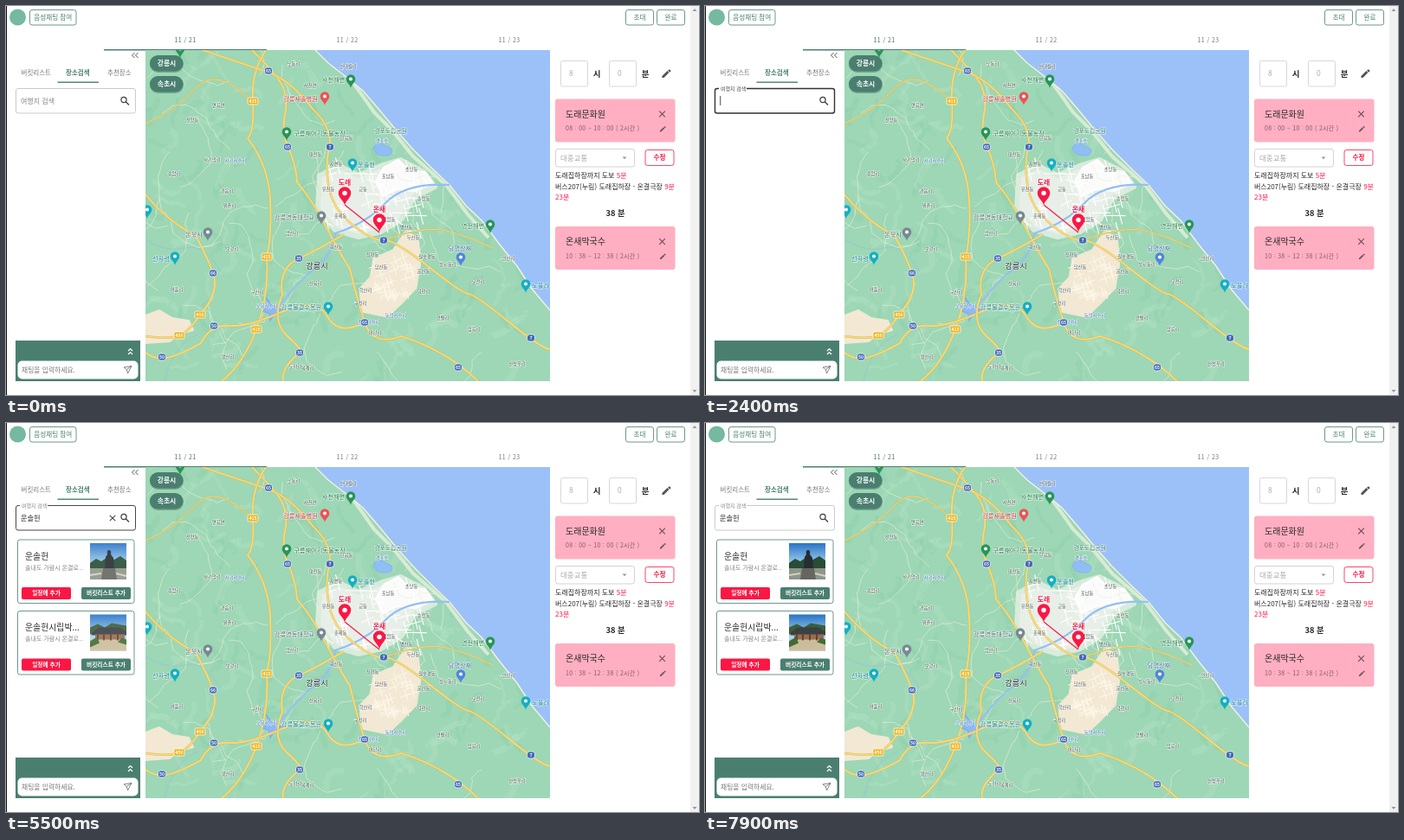
An HTML page that plays this animation: 800x450 px, repeating every 8 s.

```html
<!DOCTYPE html>
<html lang="ko">
<head>
<meta charset="utf-8">
<title>여행 일정</title>
<style>
html,body{margin:0;width:100%;height:100%;overflow:hidden;background:#fff}
svg{display:block;width:100vw;height:100vh;font-family:"Noto Sans CJK KR","Noto Sans CJK JP","Noto Sans CJK",sans-serif}
text{white-space:pre}
.halo{paint-order:stroke;stroke:#fff;stroke-opacity:.65;stroke-width:1.3px;stroke-linejoin:round}
</style>
</head>
<body>
<svg id="stage" viewBox="0 0 800 450"></svg>
<script>
const GREEN = '#4a7f70', RED = '#fb1744', PINK = '#ffafc1', GRAY = '#858585', DARK = '#272727';
const LOOP = 8000;

const text = (s, x, y, size, fill = DARK, extra = '') =>
  `<text x="${x}" y="${y}" font-size="${size}" fill="${fill}" ${extra}>${s}</text>`;
const MID = 'text-anchor="middle"', BOLD = 'font-weight="700"';
const rect = (x, y, w, h, fill, r = 0, extra = '') =>
  `<rect x="${x}" y="${y}" width="${w}" height="${h}" rx="${r}" fill="${fill}" ${extra}/>`;
const path = (d, stroke, width = 1, fill = 'none', extra = '') =>
  `<path d="${d}" stroke="${stroke}" stroke-width="${width}" fill="${fill}" ${extra}/>`;
const group = (body, extra = '') => `<g ${extra}>${body}</g>`;
const outlined = (x, y, w, h, color, label, size = 7.6, extra = '') =>
  rect(x + .5, y + .5, w - 1, h - 1, '#fff', 2.5, `stroke="${color}" stroke-width=".8"`) +
  text(label, x + w / 2, y + h / 2 + 2.8, size, color, MID + ' ' + extra);
const cross = (x, y, r, color = '#444') =>
  path(`M${x - r} ${y - r}l${2 * r} ${2 * r}m0 ${-2 * r}l${-2 * r} ${2 * r}`, color, 1.1);
const pencil = (x, y, s, color) =>
  group(`<path d="M-5 5v-2.200l6.500-6.500 2.200 2.200-6.500 6.500zM2.300-4.100l1.200-1.200q.6-.5 1.200 0l1 1q.5.600 0 1.200l-1.200 1.200z"/>`,
    `fill="${color}" transform="translate(${x} ${y}) scale(${s})"`);

let seed = 11;
const random = () => (seed = seed * 16807 % 2147483647) / 2147483647;
const wander = (x, y, steps, stride) => {
  let d = `M${x} ${y}`, angle = random() * 6.28;
  for (let i = 0; i < steps; i++) {
    angle += (random() - .5) * 1.7;
    d += `q${((random() - .5) * 6).toFixed(1)} ${((random() - .5) * 6).toFixed(1)} ` +
      `${(Math.cos(angle) * stride).toFixed(1)} ${(Math.sin(angle) * stride).toFixed(1)}`;
  }
  return d;
};

// ---------- map ----------
const COAST = 'M357 51L372 66 394 83 412 98 430 119 449 142 470 166 491 187 512 207 531 231 549 248 570 276 590 301 607 327 628 352';

const pin = (x, y, s, color) => group(
  `<path d="M0 11C-1.500 6-6 4-6-.500a6 6 0 0 1 12 0C6 4 1.500 6 0 11z" fill="${color}"/><circle r="2.300" cy="-.5" fill="#fff"/>`,
  `transform="translate(${x} ${y}) scale(${s})"`);

function shield(name, x, y, yellow) {
  const w = name.length > 2 ? 12 : 9;
  return rect(x - w / 2, y - 4, w, 8, yellow ? '#f2b51d' : '#4069b5', yellow ? 1.5 : 3, 'stroke="#fff" stroke-width=".7"') +
    text(name, x, y + 2, 5.2, '#fff', MID + ' ' + BOLD);
}

function terrain() {
  let s = '';
  for (let i = 0; i < 150; i++) {
    const x = 161 + random() * 440, y = 51 + random() * 380;
    s += path(wander(x, y, 4, 9), i % 2 ? '#b4e1c5' : '#8cceaa', 3 + random() * 5, 'none', 'opacity=".38"');
  }
  const patch = 'stroke-linejoin="round"';
  s += path('M425 292l22-9 14-21 14 6 3 27-5 31-18 19-15 14-29-6-2-26 12-13z', '#efe9d4', 3, '#f3e8d4', patch);
  s += path('M161 358l16-6 15 9 19 3 5 11-17 5-10 8-28 2z', '#efe9d4', 2, '#f3e8d4', patch);
  s += path('M362 196l24-10 21 10 28-12 20-6 27 14 13 17-24 12-15 26-23 14-26 6-27-8-20-24z', '#d9ebdc', 6, '#e8efe9', patch);
  s += path('M436 187l17-9 12 12 19 2 9 13-21 9-21-2-16 8-8-17z', '#fff', 2, '#fbfbfb', patch);
  s += path('M377 66l18 15 16 22 14 20 20 20 25 31 38 33 25 34 24 27', '#d8ebd4', 4);
  for (let i = 0; i < 38; i++) s += path(wander(170 + random() * 400, 60 + random() * 370, 7, 15), '#eaf0d5', .8, 'none', 'opacity=".8"');
  for (let i = 0; i < 34; i++) {
    const x = 365 + random() * 105, y = 190 + random() * 75;
    s += path(`M${x} ${y}l${8 + random() * 20} ${random() * 14 - 7}m-9-9l5 19`, '#fff', 1.1);
  }
  for (let i = 0; i < 30; i++) {
    const x = 418 + random() * 45, y = 292 + random() * 48;
    s += path(`M${x} ${y}l12-4m-7-5l4 12`, '#fff8ea', 1);
  }
  return s;
}

const water = () =>
  path(COAST + 'V51z', '#9bc1f8', 1, '#9bc1f8') + path(COAST, '#f5f1df', 1.4) +
  path('M424 164q4-7 11-4l10 5q3 7-6 8-13 1-15-9z', '#84b4f3', 1, '#91bdf5') +
  path('M300 337l4 9-9 7 8 2 2 9 5-8 9-5-10-2z', '#80aff0', 1.5, '#8bb8f5') +
  path('M310 355Q335 320 356 304T380 263Q415 252 438 228T512 207', '#94bff5', 2.2) +
  path('M161 270q25 16 46 10t41 27m-65 127q10-43 39-54', '#91c3df', .8);

function roads() {
  const yellow = [
    'M284 51Q303 70 314 84T323 120Q317 144 326 164T336 204Q354 225 370 256T397 304Q405 338 414 366T456 382Q506 397 545 434',
    'M300 51Q283 76 285 110T279 153Q303 184 305 224T301 290Q304 334 289 374T249 434',
    'M161 401Q174 411 190 406T225 390Q236 368 257 370T318 354 371 359 414 366',
    'M161 382Q190 386 201 381T224 357Q247 331 239 309T219 266Q184 247 161 218',
    'M390 264Q362 281 338 292T319 334Q306 365 325 382T339 401Q317 419 320 434',
    'M227 51Q274 67 301 76T354 119Q378 142 373 164T373 211 401 254 436 271 487 301 534 333 580 365 628 397',
    'M161 136Q196 121 219 95T284 110',
    'M436 271Q483 254 508 260T562 280'];
  const both = (d, w) => path(d, '#d7b75c', w + .8) + path(d, '#fbdc76', w);
  return yellow.map((d, i) => both(d, i < 6 ? 1.7 : .9)).join('');
}

const VILLAGES = `산대월리 395 72,선양동 215 134,사기막리 238 180,송암리 194 196,어흘리 197 330,위촌리 258 233,
관음리 255 216,금산리 330 265,구산리 290 333,산북리 357 323,회산동 381 281,장현동 423 290,담산동 433 304,
유천동 372 214,홍제동 386 245,교동 412 214,포남동 441 199,초당동 468 191,송정동 482 225,입암동 442 249,
병산동 462 258,두산동 470 270,월호평동 486 292,운산동 482 309,학산리 415 331,구정리 409 346,어단리 426 380,
덕현리 482 332,상시동리 510 301,언별리 504 363,모전리 545 321,안인리 580 294,산성우리 590 416,임곡리 540 376,
목계리 348 421,왕산리 256 408,도마리 334 419,보광리 261 283,난곡동 393 155,대전동 357 174,지변동 381 185,
사천면 351 94,노동리 332 69,연곡면 245 117`.split(',').map(v => v.trim().split(' '));

const POIS = [
  ['사천해변', 378, 88, '#287b4e', 398, 85], ['강릉새솔병원', 340, 110, '#d4343e', 368, 105],
  ['구름재아기동물농장', 362, 150, '#28774c', 324, 146], ['운솔헌', 416, 186, '#148197', 400, 182],
  ['강릉영동대학교', 333, 247, '#596a73', 364, 243], ['온묵사', 217, 267, '#596a73', 233, 262],
  ['선자령', 179, 295, '#148197', 195, 290], ['강릉물결수목원', 341, 351, '#148197', 372, 348],
  ['영전해변', 539, 257, '#287b4e', 559, 253], ['담명상재', 524, 283, '#3d67aa', 525, 291],
  ['노을라', 617, 326, '#148197', 600, 322], ['', 0, 0, '#148197', 163, 236], ['', 0, 0, '#287b4e', 201, 50]];
const PIN_COLORS = { '#287b4e': '#279557', '#28774c': '#279557', '#d4343e': '#ef5155', '#148197': '#12afc5', '#596a73': '#788895', '#3d67aa': '#5185dc' };

const SHIELDS = [['415', 285, 110], ['415', 301, 290], ['415', 289, 374], ['456', 224, 357], ['456', 200, 381],
  ['65', 325, 163], ['65', 303, 75], ['7', 374, 163], ['7', 436, 271], ['35', 338, 292], ['66', 239, 309],
  ['50', 240, 370], ['50', 180, 406], ['35', 339, 401], ['65', 522, 418], ['7', 606, 384], ['65', 414, 366]];

function map() {
  const halo = MID + ' class="halo"';
  let s = rect(161, 51, 467, 383, '#9dd7b5') + terrain() + water() + roads();
  s += VILLAGES.map(([n, x, y]) => text(n, x, y, 5.3, '#46544d', halo)).join('');
  s += [['경포도립공원', 444, 147], ['경포호', 434, 158], ['오봉저수지', 301, 349], ['칠성저수지', 419, 368], ['동막저수지', 450, 360], ['사기저수지', 265, 181]]
    .map(([n, x, y], i) => text(n, x, y, i ? 5.3 : 6.8, i ? '#3e70b9' : '#337d66', halo)).join('');
  s += SHIELDS.map(([n, x, y]) => shield(n, x, y, n.length > 2)).join('');
  s += POIS.map(([n, x, y, c, px, py]) => pin(px, py, .88, PIN_COLORS[c]) + text(n, x, y, 7.2, c, halo)).join('');
  s += text('강릉시', 359, 304, 9.2, '#222', halo + ' font-weight="500"');
  s += path('M391 230L431 262', RED, 1.2);
  for (const [n, x, y] of [['도래', 391, 217], ['온새', 431, 248]])
    s += pin(x, y, 1.2, RED) + text(n, x, y - 10, 7.8, RED, halo + ' ' + BOLD);
  for (const [n, y] of [['강릉시', 57], ['속초시', 81]])
    s += rect(166, y + 1, 39, 19, '#173b30', 9.5, 'opacity=".3"') + rect(166, y, 38.5, 18.5, GREEN, 9.2) +
      text(n, 185.5, y + 12.2, 7.8, '#fff', MID + ' ' + BOLD);
  return `<clipPath id="mapClip"><path d="M161 51h467v383H161z"/></clipPath>` + group(s, 'clip-path="url(#mapClip)"');
}

// ---------- fixed interface ----------
function header() {
  let s = '<circle cx="13.500" cy="13" r="9.500" fill="#74b9a0"/>';
  s += outlined(27, 4, 54.5, 18.5, GREEN, '음성채팅 참여') + outlined(715, 4, 33, 18.5, GREEN, '초대') + outlined(751, 4, 33, 18.5, GREEN, '완료');
  [21, 22, 23].forEach((day, i) => s += text('11 / ' + day, 207 + i * 187, 41.5, 7, i ? '#777' : '#476e63', MID + ' letter-spacing=".4"'));
  return s + rect(113, 50, 188, 1.5, GREEN);
}

function leftPanel() {
  let s = path('M148.500 54l-3 3 3 3m4-6l-3 3 3 3', '#555', 1);
  s += text('버킷리스트', 17.5, 79.5, 7.5, '#777') + text('장소검색', 69, 79.5, 7.5, GREEN, BOLD) + text('추천장소', 117, 79.5, 7.5, '#777');
  s += rect(59.5, 87.5, 47.5, 1.4, GREEN);
  s += rect(11, 387, 144, 47, GREEN) + path('M141 399l2.500-2.500 2.500 2.500m-5 4l2.500-2.500 2.500 2.500', '#fff', 1.2);
  s += rect(13.5, 410.5, 139, 21, '#fff', 5) + text('채팅을 입력하세요.', 18, 424, 7.8, '#777');
  return s + path('M136 418l9-1.500-4.500 8.500-1.200-4.500zm3.300 2.500l5.700-4', '#666', .8);
}

function placeCard(y, name, time) {
  return rect(634, y, 138.5, 50, PINK, 3) + text(name, 646, y + 21.3, 10, DARK, 'font-weight="500"') + cross(757.5, y + 17.5, 3.3, '#704a54') +
    text(time + ' ( 2시간 )', 646, y + 36.7, 7, '#805e67', 'letter-spacing=".3"') + pencil(758, y + 35, .62, '#70545d');
}

function rightPanel() {
  let s = '';
  for (const [x, digit, unit] of [[640, '8', '시'], [696, '0', '분']])
    s += rect(x + .5, 63.5, 31, 29.5, '#fff', 2, 'stroke="#cfcfcf" stroke-width=".8"') +
      text(digit, x + 10, 81.3, 8.5, '#aaa') + text(unit, x + 42, 81.5, 9.5, DARK, MID + ' ' + BOLD);
  s += pencil(762, 78.5, .92, '#555');
  s += placeCard(107.5, '도래문화원', '08 : 00 ~ 10 : 00') + placeCard(255, '온새막국수', '10 : 38 ~ 12 : 38');
  s += rect(634.5, 165.5, 91, 20.5, '#fff', 2.5, 'stroke="#c8c8c8" stroke-width=".8"') + text('대중교통', 640, 178.8, 8.5, '#aaa') +
    path('M711.500 174.500h5l-2.500 2.800z', 'none', 0, '#999');
  s += outlined(737.5, 166, 34, 19, RED, '수정', 7.5, BOLD);
  const mark = v => `<tspan fill="${RED}">${v}</tspan>`;
  s += text('도래집하장까지 도보 ' + mark('5분'), 634, 199.3, 8);
  s += text('버스207(누림) 도래집하장 - 온결극장 ' + mark('9분'), 634, 211.8, 8) + text('23분', 634, 224.3, 8, RED);
  return s + text('38 분', 703.5, 242.5, 9.3, DARK, MID + ' ' + BOLD);
}

const windowEdges = () => rect(0, 0, 1, 450, '#111') + rect(790, 0, 10, 450, '#f1f1f1') +
  path('M792.500 6l2.500-3 2.500 3zM792.500 444l2.500 3 2.500-3z', 'none', 0, '#999');

// ---------- search results ----------
const statuePhoto = rect(0, 0, 42, 42, 'url(#sky)') +
  path('M0 23l7-5 6 3 6-4 9 2 7-4 7 5v12H0z', 'none', 0, '#284c35') + rect(0, 29, 42, 13, '#8e958b') +
  path('M17 29l1-13 2-3q-1-5 2-5t2 5l3 4 1 12z', 'none', 0, '#252d31') + path('M13 42l2-13h14l2 13z', 'none', 0, '#65675f') +
  path('M0 37l13-2m17 0l12 3', '#d3d0bc', 2);
const housePhoto = rect(0, 0, 42, 42, 'url(#sky)') +
  path('M0 15l9-4 8 4 8-5 17 3v10H0z', 'none', 0, '#3b5f37') + path('M2 21l8-6h24l8 5v4H2z', 'none', 0, '#3b4045') +
  rect(6, 23, 34, 7, '#986c4e') + rect(0, 29, 42, 13, '#cbbd9c') + path('M9 23v7m7-7v7m8-7v7m8-7v7', '#4d3429', 1.5) +
  path('M0 31l8-5 3 7-11 5zM32 32l5-5 5 2v6z', 'none', 0, '#426c35');

function resultCard(y, name, photo) {
  const button = (x, color, label, size) => rect(x, 190, 57, 14, color, 2) + text(label, x + 28.5, 199.4, size, '#fff', MID + ' ' + BOLD);
  return group(
    rect(13.5, 135, 134.5, 73.5, '#fff', 2.5, `stroke="${GREEN}" stroke-width=".8"`) +
    text(name, 22, 157.8, 9.9) + text('솔내도 가람시 온결로...', 22, 169.8, 7, GRAY) +
    group(photo, 'class="photo" transform="translate(97 139)"') +
    button(18, RED, '일정에 추가', 6.7) + button(87, GREEN, '버킷리스트 추가', 6.7), `transform="translate(0 ${y})"`);
}

const searchBox = () =>
  rect(11.5, 95.5, 138, 28.5, '#fff', 2.5, 'id="border"') +
  rect(16, 94, 32, 4, '#fff', 0, 'id="notch"') +
  text('여행지 검색', 0, 0, 8, GRAY, 'id="label"') + text('', 17, 112.7, 8.2, DARK, 'id="query"') +
  rect(0, 104, .8, 11, '#222', 0, 'id="caret"') + group(cross(123, 110, 3.2), 'id="clear"') +
  '<circle cx="136" cy="108.500" r="3.100" fill="none" stroke="#444" stroke-width="1.200"/>' + path('M138.300 110.800l3.700 3.700', '#444', 1.4);

const $ = id => document.getElementById(id);
$('stage').innerHTML =
  '<defs><linearGradient id="sky" x2="0" y2="1"><stop stop-color="#2874c7"/><stop offset=".6" stop-color="#a9d4ee"/></linearGradient></defs>' +
  rect(0, 0, 800, 450, '#fff') + header() + map() + leftPanel() + rightPanel() + searchBox() +
  group(resultCard(0, '운솔헌', statuePhoto) + resultCard(82.5, '운솔헌시립박...', housePhoto), 'id="results"') + windowEdges();

// ---------- motion ----------
const HOVER = 1000, FOCUS = 1400, SEARCH = 5200, LEAVE = 7800;
const KEYS = [[3200, 'ㅇ'], [3300, '우'], [3400, '운'], [3600, '운ㅅ'], [3700, '운소'], [3800, '운솔'], [4000, '운솔ㅎ'], [4100, '운솔허'], [4200, '운솔헌']];
const show = (id, on) => $(id).setAttribute('visibility', on ? 'visible' : 'hidden');
let shownQuery = '';

function caretOn(t) {
  if (t < FOCUS || t >= SEARCH) return false;
  if (t < 3200) return Math.floor((t - FOCUS) / 500) % 2 === 0;
  return t < 4500 || t >= 4900;
}

function draw(t) {
  const focused = t >= FOCUS && t < SEARCH, hovered = t >= HOVER && t < LEAVE;
  const p = Math.min(1, Math.max(0, (t - FOCUS) / 200)), ease = 1 - (1 - p) ** 3;
  $('border').setAttribute('stroke', hovered ? '#333' : '#c4c4c4');
  $('border').setAttribute('stroke-width', focused ? 1.4 : .9);
  show('notch', t >= FOCUS);
  $('label').setAttribute('transform', `translate(${17 + ease} ${112.7 - 15.2 * ease}) scale(${1 - .25 * ease})`);
  $('label').setAttribute('fill', focused ? '#444' : GRAY);

  const query = KEYS.reduce((s, [at, typed]) => t >= at ? typed : s, '');
  if (query !== shownQuery) $('query').textContent = shownQuery = query;
  $('caret').setAttribute('x', 17.4 + (query ? $('query').getComputedTextLength() : 0));
  show('caret', caretOn(t));
  show('clear', query && t < LEAVE + 100);
  show('results', t >= SEARCH);
  document.querySelectorAll('.photo').forEach(el => el.setAttribute('opacity', t < 7000 ? .9 : 1));
}

const start = performance.now();
function tick() {
  draw((performance.now() - start) % LOOP);
  requestAnimationFrame(tick);
}
tick();
</script>
</body>
</html>
```
